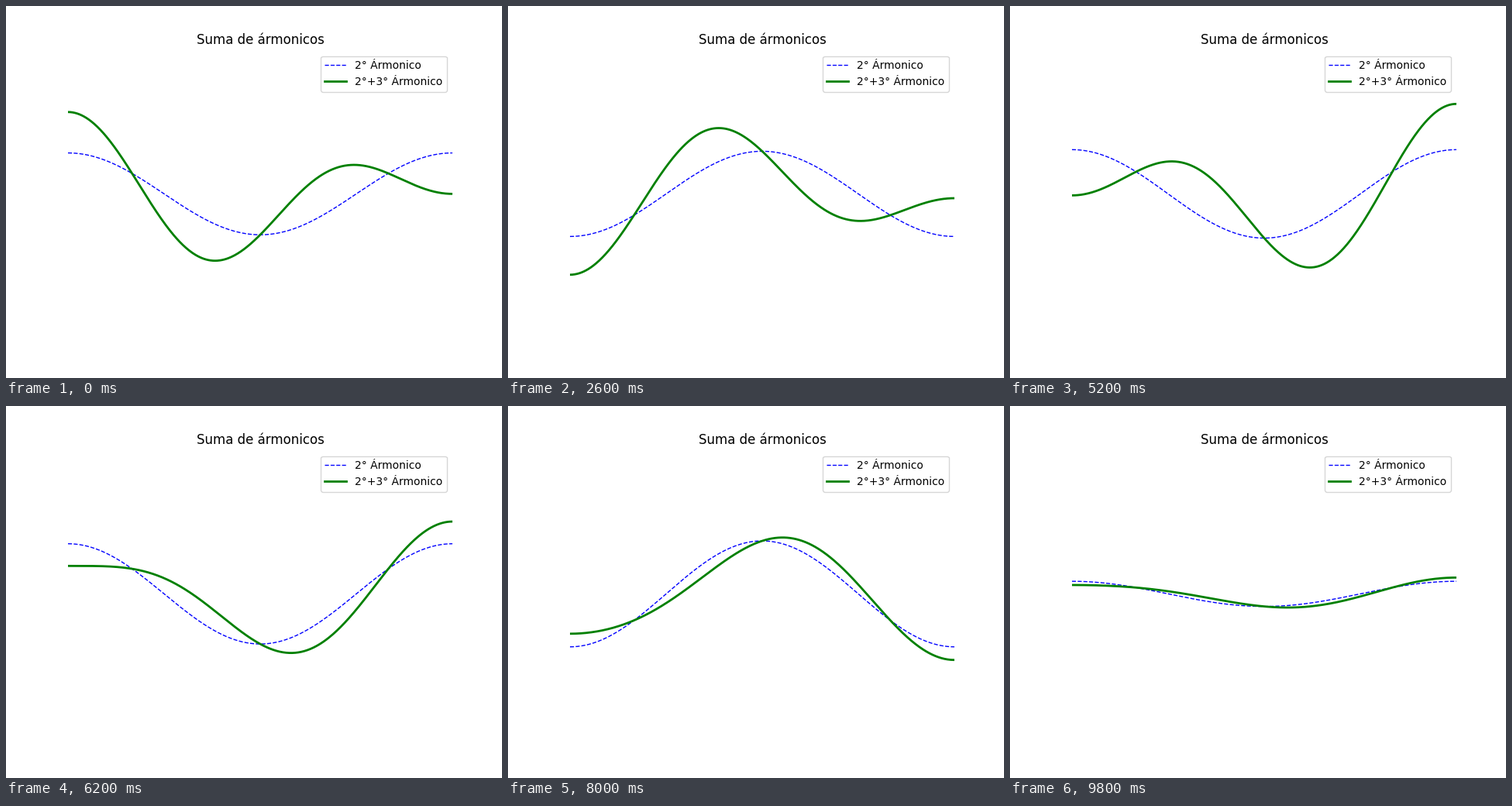
These frames come from a looping animation (640 px wide and 480 px high, 10000 ms). A matplotlib script:

```python
import numpy as np
import matplotlib.pyplot as plt
from matplotlib.animation import FuncAnimation

FRAMES = 50
INTERVAL = 200

plt.rcParams["font.family"] = "DejaVu Sans"

x = np.linspace(0, 1, 500)
times = np.linspace(0, 6, FRAMES)


def harmonic(n, t):
    """Standing wave of order n on a unit length."""
    return (np.cos(n * t) + np.sin(n * t)) * np.cos(n * np.pi * x)


fig, ax = plt.subplots(figsize=(6.4, 4.8), dpi=100)
ax.set_xlim(0, 1)
ax.set_ylim(-3.5, 3.5)
ax.axis("off")
ax.set_title("Suma de ármonicos")

second, = ax.plot([], [], "b--", lw=1, label="2° Ármonico")
total, = ax.plot([], [], "g-", lw=2, label="2°+3° Ármonico")
ax.legend(loc="upper right")


def update(i):
    t = times[i]
    base = harmonic(2, t)
    second.set_data(x, base)
    total.set_data(x, base + harmonic(3, t))
    return second, total


anim = FuncAnimation(fig, update, frames=FRAMES, interval=INTERVAL,
                     repeat=True, repeat_delay=0, blit=False)
plt.show()
```
